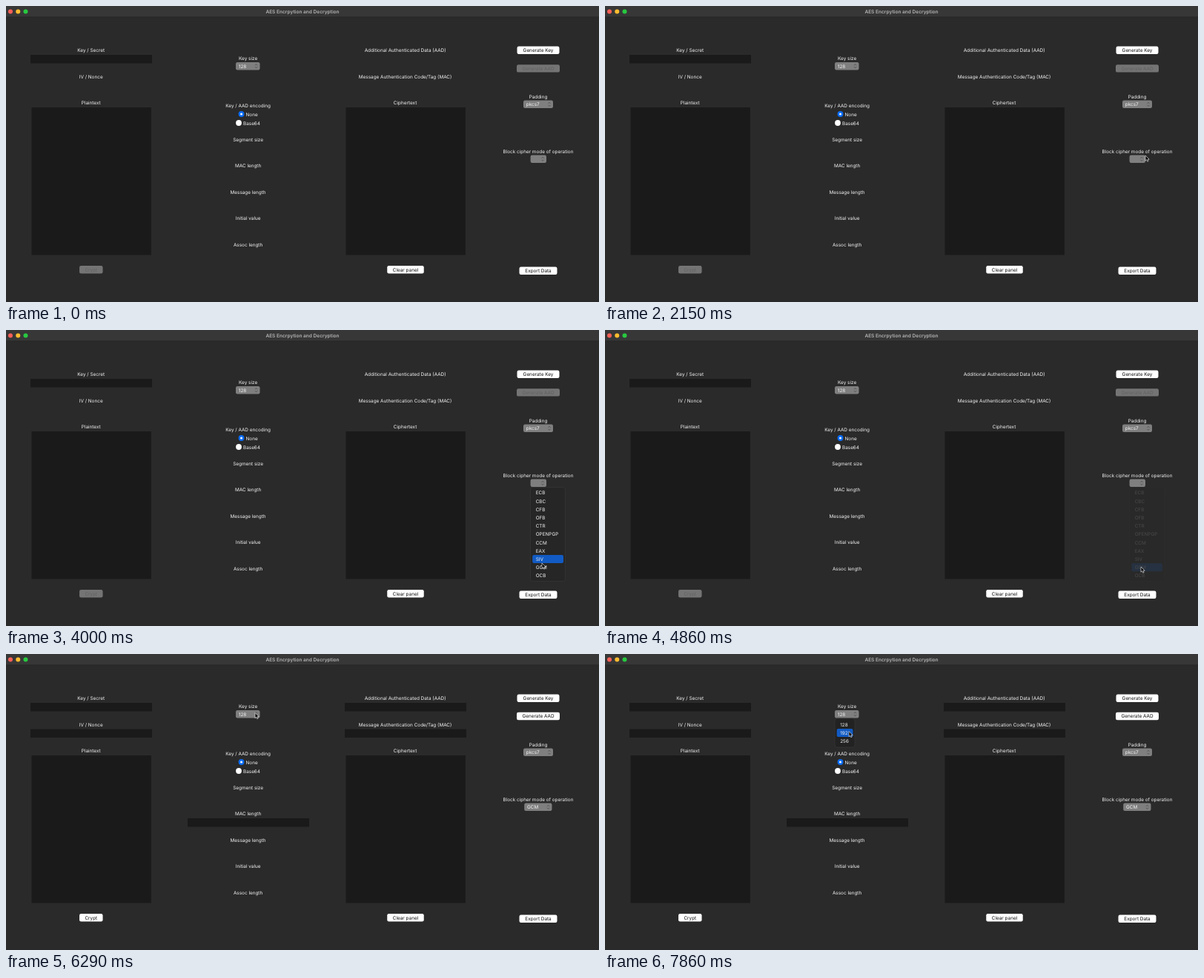
These frames come from a looping animation (800x400 px, 8000 ms). An HTML page:

```html
<!DOCTYPE html>
<html lang="en">
<head>
<meta charset="utf-8">
<title>AES Encrpytion and Decryption</title>
<style>
  html, body { margin: 0; width: 100%; height: 100%; overflow: hidden; background: #2a2a2a; }
  svg { display: block; width: 800px; height: 400px; }
  text { font: 6.4px Inter, "Liberation Sans", sans-serif; fill: #f4f4f4; text-rendering: geometricPrecision; }
  .title { font-size: 6.55px; font-weight: 600; fill: #b4b4b4; }
  .mid { text-anchor: middle; }
  .dark { fill: #111; }
  .off { fill: #626262; }
</style>
</head>
<body>
<svg id="stage" viewBox="0 0 800 400"></svg>
<script>
const LOOP = 8000, TICKS_PER_SECOND = 7;
const CAP_HALF = 2.3;
const stage = document.getElementById('stage');

function add(parent, tag, attrs, content) {
  const el = document.createElementNS('http://www.w3.org/2000/svg', tag);
  for (const name in attrs) el.setAttribute(name, attrs[name]);
  if (content) el.textContent = content;
  parent.appendChild(el);
  return el;
}
const group = (parent = stage) => add(parent, 'g', {});
const rect = (parent, x, y, width, height, fill, rx = 0) =>
  add(parent, 'rect', { x, y, width, height, fill, rx });
const circle = (parent, cx, cy, r, fill) => add(parent, 'circle', { cx, cy, r, fill });
const text = (parent, content, x, cy, cls = '') =>
  add(parent, 'text', { x, y: cy + CAP_HALF, class: cls }, content);
const field = (parent, x, y, w = 164, h = 11.5) => rect(parent, x, y, w, h, '#1a1a1a');
const show = (el, visible) => el.setAttribute('visibility', visible ? 'visible' : 'hidden');

function button(parent, label, cx, cy, w, enabled = true) {
  rect(parent, cx - w / 2, cy - 5.2, w, 10.4, enabled ? '#fff' : '#747474', 2.2);
  text(parent, label, cx, cy, 'mid ' + (enabled ? 'dark' : 'off'));
}

function popup(parent, label, x, cy, w) {
  rect(parent, x, cy - 5.2, w, 10.4, '#7f7f7f', 2.2);
  text(parent, label, x + 3.8, cy);
  const ax = x + w - 5;
  add(parent, 'path', {
    d: `M${ax - 1.5} ${cy - 1}l1.5-1.6 1.5 1.6M${ax - 1.5} ${cy + 1}l1.5 1.6 1.5-1.6`,
    fill: 'none', stroke: '#444', 'stroke-width': .7
  });
}

const ROW = 11.2;
function menu(labels, x, y, w, h, firstRow, fill) {
  const root = group();
  const frame = rect(root, x, y, w, h, fill, 3);
  frame.setAttribute('stroke', '#3a3a3a');
  frame.setAttribute('stroke-width', .6);
  const bar = rect(root, x + 2.7, 0, w - 5.2, 11, '#125bc4', 2);
  labels.forEach((label, i) => text(root, label, x + 7.2, firstRow + i * ROW));
  return {
    update(opacity, pointerY) {
      const row = Math.floor((pointerY - firstRow + ROW / 2) / ROW);
      root.setAttribute('opacity', opacity);
      show(root, opacity > 0);
      bar.setAttribute('y', firstRow + row * ROW - 5.5);
      bar.setAttribute('opacity', row >= 0 && row < labels.length ? 1 : 0);
    }
  };
}

// Window and controls that never change
rect(stage, 0, 0, 800, 400, '#2a2a2a');
rect(stage, 0, 0, 800, 15, '#373737');
rect(stage, 0, 14.6, 800, .6, '#1f1f1f');
['#ff5f57', '#febc2e', '#28c840'].forEach((color, i) => circle(stage, 6 + i * 10.25, 7.5, 3, color));
text(stage, 'AES Encrpytion and Decryption', 400, 7.3, 'mid title');

[
  ['Key / Secret', 114.7, 59.7], ['IV / Nonce', 114.7, 95.4], ['Plaintext', 114.7, 130.8],
  ['Key size', 326.6, 70.4], ['Key / AAD encoding', 326.6, 134.4],
  ['Additional Authenticated Data (AAD)', 538.6, 59.7],
  ['Message Authentication Code/Tag (MAC)', 538.6, 95.4], ['Ciphertext', 538.6, 130.8],
  ['Padding', 718, 122.2], ['Block cipher mode of operation', 718, 196.5]
].forEach(([label, x, y]) => text(stage, label, x, y, 'mid'));
['Segment size', 'MAC length', 'Message length', 'Initial value', 'Assoc length']
  .forEach((label, i) => text(stage, label, 326.6, 180.3 + i * 35.6, 'mid'));

field(stage, 33, 66);
field(stage, 34.5, 137, 161.3, 199.5);
field(stage, 458.5, 137, 161.3, 199.5);
popup(stage, '128', 310, 81.2, 32.5);
popup(stage, 'pkcs7', 698, 132.8, 40);
button(stage, 'Generate Key', 718, 59.8, 57);
button(stage, 'Clear panel', 539, 356.2, 49.5);
button(stage, 'Export Data', 718, 357.7, 51);

circle(stage, 317.5, 146, 3.9, '#0a6cf5');
circle(stage, 317.5, 146, 1.5, '#fff');
text(stage, 'None', 323.5, 146.2);
circle(stage, 314, 158, 3.9, '#fff');
text(stage, 'Base64', 320, 158.3);

// Controls before and after a mode is chosen
const before = group();
button(before, 'Generate AAD', 718, 84.4, 58, false);
button(before, 'Crypt', 114.8, 356.2, 31.5, false);
popup(before, '', 707.6, 206.8, 21.4);

const after = group();
button(after, 'Generate AAD', 718, 84, 58);
button(after, 'Crypt', 114.8, 356.2, 31.5);
popup(after, 'GCM', 699.2, 206.8, 37.3);
field(after, 33, 101.5);
field(after, 457, 66);
field(after, 457, 101.5);
field(after, 245, 222);

const modeMenu = menu(
  ['ECB', 'CBC', 'CFB', 'OFB', 'CTR', 'OPENPGP', 'CCM', 'EAX', 'SIV', 'GCM', 'OCB'],
  707.5, 212.5, 47, 127, 220, '#262626');
const sizeMenu = menu(['128', '192', '256'], 310, 87, 27, 39, 95.2, '#222');

const pointer = add(stage, 'path', {
  d: 'M0 0V7.2L1.7 5.6 2.8 8.2 4.1 7.6 3 5.2H5.2Z',
  fill: '#000', stroke: '#fff', 'stroke-width': .6, 'stroke-linejoin': 'round'
});

// Pointer path: tick, x, y
const PATH = [
  [6, 696, 392], [7, 696, 320], [8, 696, 237], [9, 696, 237], [10, 699, 232], [13, 724, 206],
  [15, 729, 202], [17, 723, 204], [18, 723, 207], [20, 724, 222], [21, 724, 222],
  [24, 724, 241], [28, 723, 315], [29, 723, 320], [34, 723, 320], [35, 723, 318],
  [37, 720, 206], [39, 412, 100], [40, 412, 100], [42, 368, 87], [44, 336, 79.5],
  [46, 336, 79.5], [48, 329, 81], [49, 329, 83], [50, 328, 107], [51, 328, 107],
  [53, 329, 104.5]
];

function pointerAt(tick) {
  const next = PATH.findIndex(p => p[0] > tick);
  if (next < 0) return PATH[PATH.length - 1].slice(1);
  if (next === 0) return PATH[0].slice(1);
  const [t0, x0, y0] = PATH[next - 1], [t1, x1, y1] = PATH[next];
  const k = (tick - t0) / (t1 - t0);
  return [x0 + (x1 - x0) * k, y0 + (y1 - y0) * k];
}

function modeOpacity(tick) {
  if (tick < 18 || tick > 34) return 0;
  return tick === 34 ? .15 : tick === 33 ? .6 : 1;
}

function render(ms) {
  const tick = Math.floor(ms * TICKS_PER_SECOND / 1000);
  const [x, y] = pointerAt(tick);
  show(pointer, tick >= 6);
  pointer.setAttribute('transform', `translate(${x} ${y})`);
  show(before, tick < 35);
  show(after, tick >= 35);
  modeMenu.update(modeOpacity(tick), y);
  sizeMenu.update(tick >= 49 ? 1 : 0, y);
}

const start = performance.now();
function loop() {
  render((performance.now() - start) % LOOP);
  requestAnimationFrame(loop);
}
loop();
</script>
</body>
</html>
```
